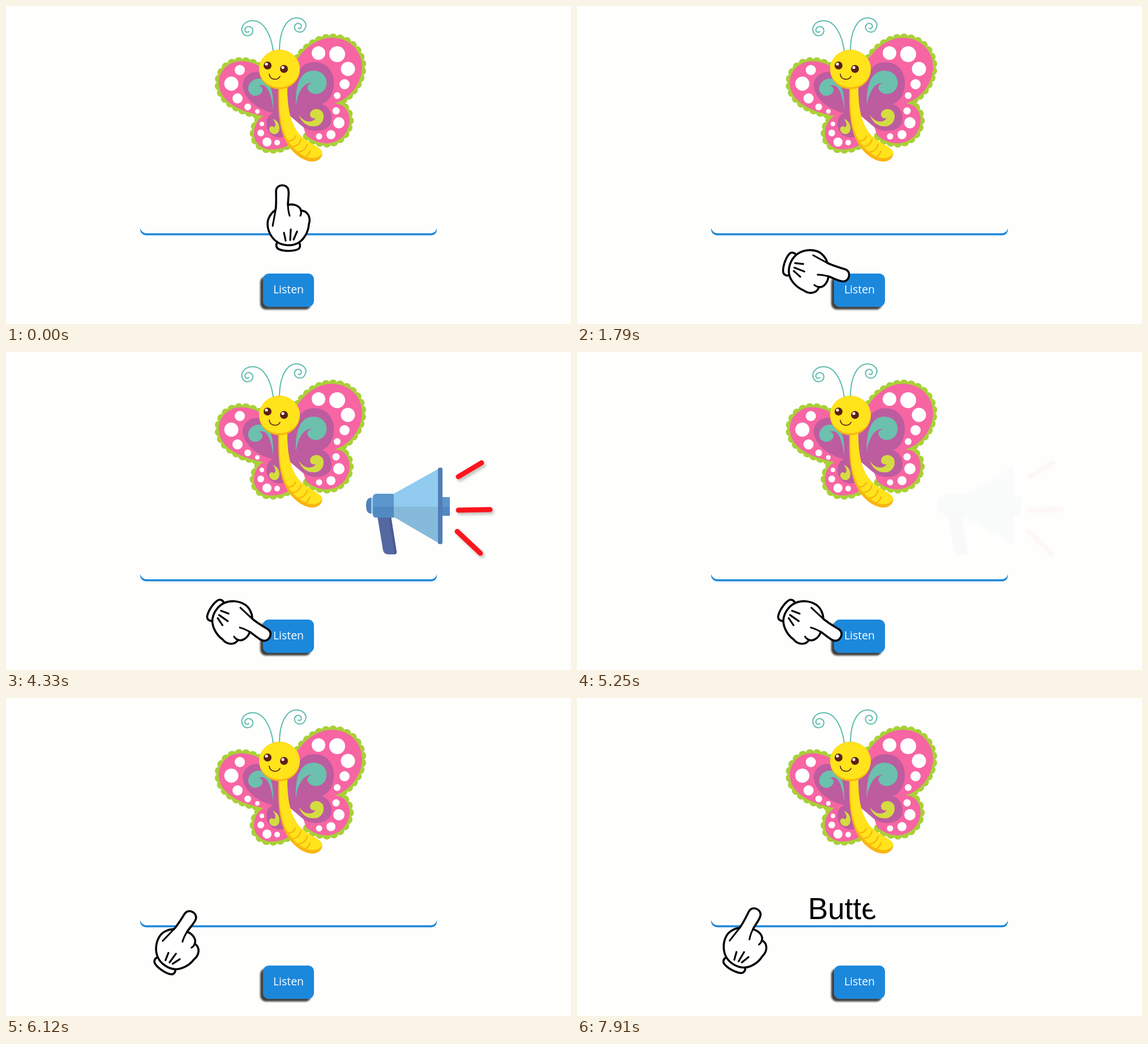
These frames come from a looping animation (998 px wide and 561 px high, 8 s). An HTML page:

```html
<!DOCTYPE html>
<html lang="en">
<head>
<meta charset="utf-8">
<title>Butterfly word card</title>
<style>
  html, body { margin: 0; width: 100%; height: 100%; overflow: hidden; background: #fefefd; }
  svg { display: block; width: 100%; height: 100%; }
  .scallops { fill: none; stroke: #a9d036; stroke-width: 15; stroke-linecap: round; stroke-dasharray: 0 12.5; }
  .line { fill: none; stroke-linecap: round; stroke-linejoin: round; }
  #word { font: 53px "Liberation Sans", Arial, sans-serif; }
  #label { font: 19.5px "Comic Neue", "Open Sans", sans-serif; fill: #fff; }
</style>
</head>
<body>
<svg viewBox="0 0 998 561">
  <defs>
    <filter id="buttonShadow" x="-20%" y="-20%" width="140%" height="140%">
      <feDropShadow dx="-5" dy="5" stdDeviation="1.6" flood-color="#000" flood-opacity=".75"/>
    </filter>
    <filter id="softShadow" filterUnits="userSpaceOnUse" x="780" y="180" width="100" height="195">
      <feDropShadow dx="3" dy="4" stdDeviation="2.5" flood-color="#000" flood-opacity=".25"/>
    </filter>
    <path id="rightWing" d="M497 125C520 73 550 56 577 56C610 57 630 82 629 110C627 140 605 165 580 172C597 172 607 185 607 203C605 228 585 244 562 242C551 241 540 237 530 228"/>
    <path id="leftWing" d="M457 114C442 99 420 95 404 99C386 104 375 120 376 138C378 165 405 185 455 194C443 200 437 215 438 228C441 245 455 254 472 253C487 252 496 249 503 240"/>
    <clipPath id="reveal"><polygon id="revealShape"/></clipPath>
  </defs>

  <!-- butterfly -->
  <g class="line" stroke="#5dbdac" stroke-width="2">
    <path d="M472 79C468 50 455 25 435 26C421 26 413 38 418 47C422 55 434 54 436 45C437 38 429 34 424 38C419 43 424 49 429 45"/>
    <path d="M483 78C483 45 495 20 514 21C527 22 533 32 528 40C525 48 513 48 510 40C508 33 515 28 520 32C524 36 520 42 516 39"/>
  </g>
  <use href="#leftWing" class="scallops"/>
  <use href="#rightWing" class="scallops"/>
  <g fill="#f765a3"><use href="#leftWing"/><use href="#rightWing"/></g>
  <g fill="#bd5c9f">
    <path d="M452 117C431 113 419 125 418 140C419 160 440 182 472 189C462 192 458 203 461 215C466 230 480 235 493 230L490 146Z"/>
    <path d="M490 145L512 122C520 106 530 99 545 99C568 99 581 118 579 140C577 158 570 168 558 173C572 178 578 193 574 207C565 223 540 225 523 212L497 190Z"/>
  </g>
  <g fill="#6cc0ae">
    <path d="M472 183C473 150 467 129 448 128C432 128 425 142 429 151C434 162 449 160 453 150C454 144 450 141 446 141C461 134 469 155 472 183Z"/>
    <path d="M512 177C510 140 520 115 542 114C562 114 570 130 565 143C560 157 540 160 533 147C531 142 534 137 541 136C528 133 515 150 512 177Z"/>
  </g>
  <g fill="#d4dc40">
    <path d="M471 199C481 202 485 212 482 221C478 229 468 227 465 219C464 213 470 210 473 214C478 212 476 204 471 199Z"/>
    <path d="M517 191C522 208 535 214 548 212C560 209 564 195 559 187C552 178 538 181 537 191C537 197 543 200 547 197C544 206 526 208 517 191Z"/>
  </g>
  <g id="dots" fill="#fff"></g>
  <path fill="#f9b511" d="M481 140C480 185 482 215 495 240C508 264 530 277 546 274C557 271 561 261 557 255C550 246 530 240 517 225C503 208 496 180 497 140Z"/>
  <path fill="#ffe31b" d="M483 140C482 185 484 213 498 237C511 258 530 270 545 268C556 266 561 259 557 255C550 246 530 240 517 225C503 208 496 180 497 140Z"/>
  <g class="line" stroke="#f9b511" stroke-width="2.4">
    <path d="M497 238Q508 239 511 230M506 248Q518 247 521 235M516 258Q529 256 532 244M529 266Q535 262 537 256"/>
  </g>
  <ellipse cx="483" cy="112" rx="36" ry="35" fill="#f9b511"/>
  <ellipse cx="483" cy="110.500" rx="36" ry="33" fill="#ffe31b"/>
  <g fill="#5b2015"><circle cx="462" cy="105" r="7"/><circle cx="491" cy="111" r="7"/></g>
  <g fill="#fff"><circle cx="460" cy="102.500" r="2.600"/><circle cx="489" cy="108.500" r="2.600"/></g>
  <path class="line" stroke="#5b2015" stroke-width="1.700" d="M465 120C466 131 481 132 484 124"/>

  <!-- answer line and button -->
  <path fill="#1c87d8" d="M237 392C236 401 243 404.500 249 404.500H750C756 404.500 762 401 761 392C760 398 755 401 750 401H249C243 401 239 398 237 392Z"/>
  <rect x="454" y="472" width="90" height="58.500" rx="10" fill="#1c88dc" filter="url(#buttonShadow)"/>
  <text id="label" x="499" y="507" text-anchor="middle">Listen</text>
  <text id="word" x="408" y="390" clip-path="url(#reveal)">Butte</text>

  <!-- megaphone -->
  <g id="megaphone">
    <path fill="#4e649f" d="M656 290H680L690 353Q690 357 686 357H675Q668 357 666 350Z"/>
    <path fill="#435891" d="M676 290H680L690 353Q690 357 686 357Z"/>
    <path fill="#8fd0e8" d="M642 257H651V285H642Z"/>
    <path fill="#4b7cb6" d="M645 257V285Q636 285 636 271Q636 257 645 257Z"/>
    <rect x="648" y="250" width="40" height="42" rx="6" fill="#5793cb"/>
    <path fill="#4b86c0" d="M648 273H686V292H654Q648 292 648 286Z"/>
    <path fill="#8ecaf0" d="M685 250L764 206V273H685Z"/>
    <path fill="#82b8da" d="M685 273H764V337L685 291Z"/>
    <path fill="#5793cb" d="M770 256H784V273H770Z"/>
    <path fill="#4b84c0" d="M770 273H784V289H770Z"/>
    <rect x="763" y="204" width="8" height="135" rx="3" fill="#4b79b7"/>
    <path class="line" stroke="#fd0c12" stroke-width="9" filter="url(#softShadow)" d="M799 220L840 195.500M799 279L855 278M797 316.500L838 355"/>
  </g>

  <!-- hand, drawn pointing up around its pivot -->
  <g id="hand" class="line" stroke="#000" stroke-width="3.600">
    <path fill="#fff" d="M480 417C476 420 477 427 482 429C491 433 508 433 516 429C521 426 520 419 516 416Z"/>
    <path fill="#fff" d="M476 360C478 348 477 336 477 326C478 313 498 313 499 326C500 334 498 342 498 351C510 348 520 354 521 361C533 361 539 373 535 385C534 400 525 413 516 418C505 424 490 423 480 417C469 410 462 397 462 384C462 375 468 365 476 360Z"/>
    <path d="M477 355Q475 367 471 388M498 349Q498 361 501 370M521 361Q522 366 520 370" stroke-width="3"/>
    <path d="M491 400L494 414M503 394L502 413M514 398L508 412" stroke-width="3.200"/>
  </g>
</svg>
<script>
const $ = id => document.getElementById(id);
const LOOP = 8000;
const PIVOT = { x: 492.5, y: 375.5 };
const POSES = [
  { x: 492.5, y: 375.5, angle: 0 },
  { x: 413, y: 476, angle: 122.5 },
  { x: 294.5, y: 427, angle: 27.8 }
];
const LETTER_STARTS = [6660, 7140, 7355, 7570, 7785];
const LETTER_TIME = 215;
const SLANT = 30;

// x, y, radius of the white wing spots
const SPOTS = [
  [552, 83, 12], [585, 85, 14], [604, 111, 12.5], [598, 138, 9], [585, 158, 6],
  [583, 185, 6.5], [588, 206, 10], [574, 227, 8], [553, 230, 5.5],
  [413, 113, 9], [398, 137, 12.5], [409, 163, 9], [427, 178, 6], [444, 186, 4],
  [452, 208, 4], [450, 224, 6], [461, 240, 8], [479, 241, 5]
];
$('dots').innerHTML = SPOTS.map(([x, y, r]) => `<circle cx="${x}" cy="${y}" r="${r}"/>`).join('');

const progress = (t, start, duration) => Math.min(1, Math.max(0, (t - start) / duration));
const ease = p => (1 - Math.cos(Math.PI * p)) / 2;

function placeHand(t) {
  const toButton = ease(progress(t, 1030, 980));
  const toLine = ease(progress(t, 5270, 1010));
  const at = key => POSES[0][key]
    + (POSES[1][key] - POSES[0][key]) * toButton
    + (POSES[2][key] - POSES[1][key]) * toLine;
  $('hand').setAttribute('transform',
    `translate(${at('x')} ${at('y')}) rotate(${at('angle')}) translate(${-PIVOT.x} ${-PIVOT.y})`);
}

// Finished letters show whole; the current one is wiped in along a slanted edge.
function revealWord(t) {
  const index = LETTER_STARTS.findLastIndex(start => t >= start);
  if (index < 0) return $('revealShape').setAttribute('points', '');
  const left = $('word').getStartPositionOfChar(index).x;
  const right = $('word').getEndPositionOfChar(index).x;
  const edge = left + progress(t, LETTER_STARTS[index], LETTER_TIME) * (right - left + SLANT);
  const top = Math.min(right, Math.max(left, edge - SLANT));
  const bottom = Math.min(right, edge);
  $('revealShape').setAttribute('points', `400,345 ${top},345 ${bottom},395 400,395`);
}

function draw(now) {
  const t = now % LOOP;
  placeHand(t);
  $('megaphone').setAttribute('opacity', progress(t, 2010, 990) - progress(t, 4295, 980));
  revealWord(t);
  requestAnimationFrame(draw);
}
draw(0);
</script>
</body>
</html>
```
